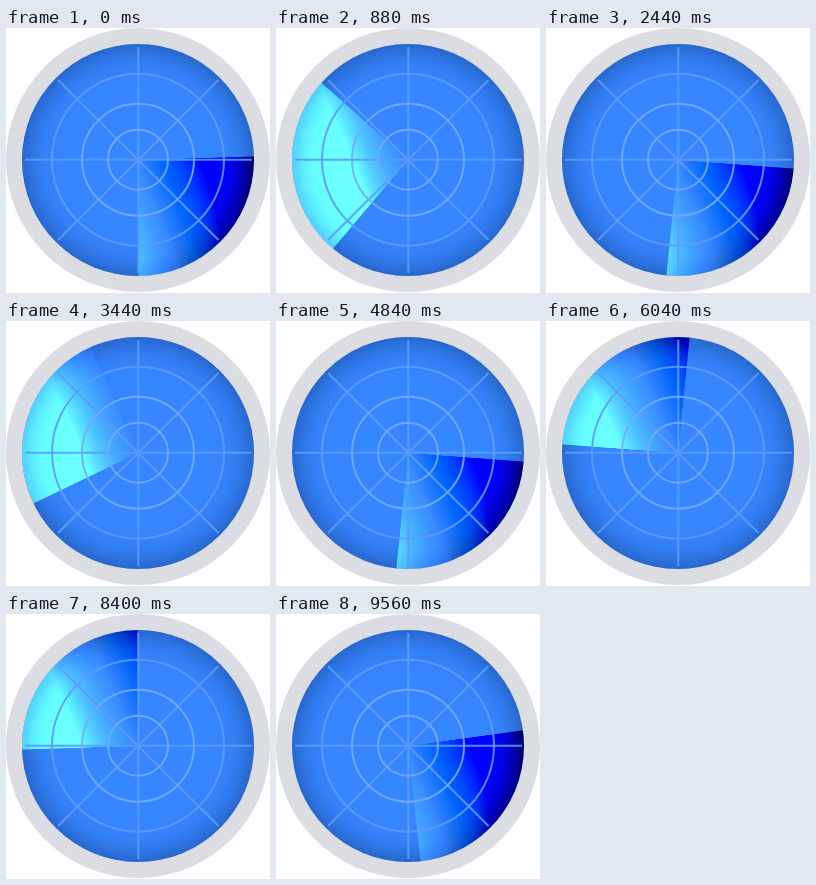
An HTML page for the animation above (9600 ms loop, 264 by 265 pixels).

```html
<!DOCTYPE html>
<html lang="en">
<head>
<meta charset="utf-8">
<title>Radar</title>
<style>
  @property --turn {
    syntax: "<angle>";
    inherits: true;
    initial-value: 0deg;
  }
  html, body {
    margin: 0;
    width: 100%;
    height: 100%;
    overflow: hidden;
    background: #fff;
  }
  .radar {
    position: absolute;
    left: 0;
    top: 0;
    width: 264px;
    height: 264px;
    border-radius: 50%;
    background: #dcdde3;
    isolation: isolate;
    animation: sweep 2.4s steps(60) infinite;
  }
  .dish, .beam {
    position: absolute;
    inset: 16px;
    border-radius: 50%;
  }
  .dish {
    background: #3686ff;
    box-shadow: inset 0 0 32px rgba(0, 20, 70, .5);
  }
  /* The wedge turns while its light and dark sides stay put. */
  .beam {
    --wedge: conic-gradient(from calc(88deg + var(--turn)),
      #0000, #000 .5deg 91.5deg, #0000 92deg);
    -webkit-mask: var(--wedge);
    mask: var(--wedge);
  }
  .light {
    background: linear-gradient(68deg, #808080 calc(50% - 54px), #000 calc(50% + 2px));
    mix-blend-mode: color-dodge;
  }
  .dark {
    background: linear-gradient(68deg, #fff calc(50% - 2px), #7a7a7a calc(50% + 56px), #484848 calc(50% + 112px));
    mix-blend-mode: color-burn;
  }
  svg {
    position: absolute;
    inset: 0;
    fill: none;
    stroke: #5b9cff;
    stroke-width: 2;
    stroke-opacity: .9;
  }
  .near { stroke: #70acff; }
  @keyframes sweep {
    to { --turn: 360deg; }
  }
</style>
</head>
<body>
<div class="radar">
  <div class="dish"></div>
  <div class="beam light"></div>
  <div class="beam dark"></div>
  <svg width="264" height="264" viewBox="0 0 264 264">
    <path d="M19 131.7H246M132.3 19V245M52 52L212.500 212M212.500 52L52 212"/>
    <circle cx="132" cy="131.700" r="86"/>
    <circle class="near" cx="132" cy="131.700" r="56"/>
    <circle class="near" cx="132" cy="131.700" r="30"/>
  </svg>
</div>
</body>
</html>
```
